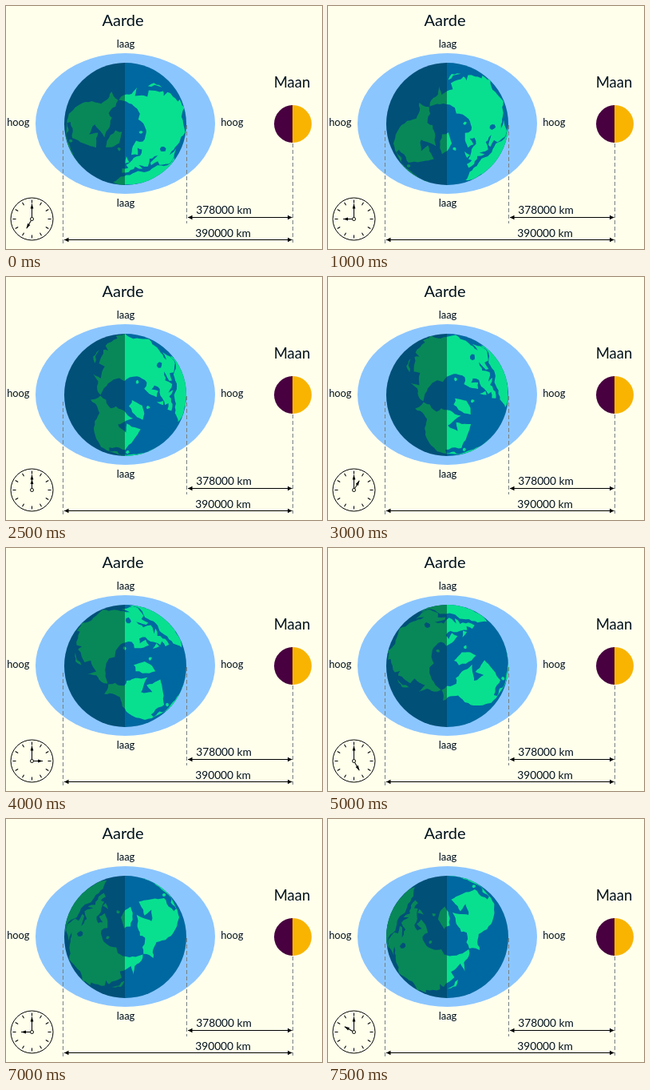
An HTML page with a canvas for the animation above (8000 ms loop, 396x304 px).

```html
<!DOCTYPE html>
<html lang="nl">
<head>
<meta charset="utf-8">
<title>Aarde, maan en getij</title>
<style>
html, body { margin: 0; width: 396px; height: 304px; overflow: hidden; background: #ffffec; }
canvas { display: block; }
</style>
</head>
<body>
<canvas id="stage" width="396" height="304"></canvas>
<script>
const ctx = document.getElementById('stage').getContext('2d');
const STEP = 500, STEPS = 16, START_HOUR = 7, START_LON = -85;
const RAD = Math.PI / 180, TAU = Math.PI * 2;
const PAPER = '#ffffec', INK = '#000';
const EARTH = { x: 149.5, y: 147.5, r: 76.5 };
const NIGHT = { sea: '#005078', land: '#088858' };
const DAY = { sea: '#0068a0', land: '#08e090' };

let seed = 11;
function random() {
  seed = (seed * 16807) % 2147483647;
  return seed / 2147483647;
}
const jitter = size => (random() - 0.5) * 2 * size;

// Orthographic view from above the north pole
function project(lon, lat) {
  const r = EARTH.r * (lat < 0 ? 1 - lat / 40 : Math.cos(lat * RAD));
  return [r * Math.cos(lon * RAD), -r * Math.sin(lon * RAD)];
}

// Joins key points (longitude, latitude) with a slightly ragged shore
function shore(...keys) {
  const points = [];
  keys.forEach(([lon, lat], i) => {
    const [lon2, lat2] = keys[(i + 1) % keys.length];
    const [x, y] = project(lon, lat), [x2, y2] = project(lon2, lat2);
    const parts = Math.max(1, Math.round(Math.hypot(x2 - x, y2 - y) / 4));
    points.push([x, y]);
    for (let k = 1; k < parts; k++) {
      const t = k / parts;
      const [px, py] = project(lon + (lon2 - lon) * t, lat + (lat2 - lat) * t);
      points.push([px + jitter(0.8), py + jitter(0.8)]);
    }
  });
  return points;
}

function blob(lon, lat, size) {
  const [x, y] = project(lon, lat);
  return Array.from({ length: 7 }, (_, i) => {
    const a = i * TAU / 7, r = size * (1 + jitter(0.3));
    return [x + r * Math.cos(a), y + r * Math.sin(a)];
  });
}

const eurasia = shore(
  [190, 66], [179, 62], [163, 60], [157, 51], [156, 61], [136, 55], [140, 48], [128, 40],
  [126, 35], [121, 39], [122, 30], [108, 21], [109, 12], [102, 12], [103, 2], [98, 15],
  [92, 22], [80, 13], [77, 8], [72, 20], [57, 26], [48, 30], [59, 22], [45, 13], [35, 29],
  [36, 36], [27, 37], [28, 41], [41, 42], [30, 46], [23, 38], [13, 45], [16, 38], [8, 44],
  [-1, 38], [-9, 37], [-9, 43], [-1, 44], [-4, 48], [9, 55], [20, 55], [28, 60], [22, 64],
  [17, 57], [6, 59], [13, 67], [28, 71], [40, 66], [68, 69], [104, 77], [120, 73], [165, 70]);
const africa = shore(
  [33, 31], [43, 12], [51, 12], [42, -8], [10, -8], [8, 4], [-8, 4], [-17, 14], [-10, 30],
  [10, 37], [20, 31]);
const america = shore(
  [-168, 66], [-156, 71], [-128, 71], [-120, 76], [-85, 75], [-62, 66], [-78, 65], [-94, 60],
  [-79, 52], [-77, 62], [-56, 52], [-66, 45], [-76, 35], [-80, 26], [-90, 30], [-97, 26],
  [-96, 18], [-88, 21], [-84, 10], [-72, 12], [-50, 0], [-50, -8], [-80, -8], [-78, 6],
  [-86, 11], [-105, 20], [-113, 30], [-124, 42], [-135, 59], [-150, 60], [-162, 55], [-162, 60]);
const greenland = shore([-45, 60], [-54, 69], [-62, 79], [-28, 82], [-22, 71]);
const japan = shore([130, 32], [140, 35], [144, 44], [140, 42], [138, 37]);
const britain = shore([-5, 50], [1, 51], [-3, 58]);
const iceland = blob(-19, 65, 2.3), novaya = blob(57, 73, 2.2), cuba = blob(-78, 21, 2);
const lands = [eurasia, africa, america, greenland, japan, britain, iceland, novaya, cuba];
const caspian = blob(51, 42, 3.2);

function disc(x, y, rx, ry, color) {
  ctx.fillStyle = color;
  ctx.beginPath();
  ctx.ellipse(x, y, rx, ry, 0, 0, TAU);
  ctx.fill();
}

function line(x1, y1, x2, y2) {
  ctx.beginPath();
  ctx.moveTo(x1, y1);
  ctx.lineTo(x2, y2);
  ctx.stroke();
}

function poly(points, color) {
  ctx.fillStyle = color;
  ctx.beginPath();
  points.forEach(([x, y]) => ctx.lineTo(x, y));
  ctx.fill();
}

function clipBox(x, y, w, h) {
  ctx.beginPath();
  ctx.rect(x, y, w, h);
  ctx.clip();
}

function earthHalf(x, turn, tone) {
  const { x: cx, y: cy, r } = EARTH;
  ctx.save();
  clipBox(x, cy - 80, 80, 160);
  disc(cx, cy, r, r, tone.sea);
  ctx.clip();
  ctx.translate(cx, cy);
  ctx.rotate(-turn * RAD);
  lands.forEach(land => poly(land, tone.land));
  poly(caspian, tone.sea);
  ctx.restore();
}

function moonHalf(x, color) {
  ctx.save();
  clipBox(x, 120, 30, 56);
  disc(359.5, 147.5, 23.5, 23.5, color);
  ctx.restore();
}

function text(str, x, y, size) {
  ctx.font = size + 'px "Comic Sans MS", Lato, sans-serif';
  ctx.fillStyle = '#00101c';
  ctx.textAlign = 'center';
  ctx.fillText(str, x, y);
}

function labels() {
  text('Aarde', 146.5, 24.5, 20);
  text('Maan', 358.5, 101.5, 18.5);
  [52, 251].forEach(y => text('laag', 150, y, 13));
  [15.3, 283.3].forEach(x => text('hoog', x, 150, 12.8));
  text('378000 km', 273, 259.5, 13.7);
  text('390000 km', 272, 288.5, 13.7);
}

function arrowHead(x, y, dx) {
  poly([[x, y], [x + dx, y - 2.8], [x + dx, y + 2.8]], INK);
}

function span(x1, x2, y) {
  ctx.strokeStyle = INK;
  line(x1, y, x2, y);
  arrowHead(x1, y, 5.5);
  arrowHead(x2, y, -5.5);
}

function distances() {
  ctx.lineWidth = 1;
  ctx.strokeStyle = '#778080';
  ctx.setLineDash([5, 3]);
  line(71.5, 156, 71.5, 297);
  line(226.5, 149, 226.5, 272);
  line(359.5, 172, 359.5, 296);
  ctx.setLineDash([]);
  span(228, 358.5, 264.5);
  span(73, 358.5, 292.5);
}

function hand(hour, length) {
  ctx.save();
  ctx.rotate(hour * TAU / 12);
  line(0, -2, 0, -length);
  poly([[0, -length], [1.9, -length + 6], [-1.9, -length + 6]], INK);
  ctx.restore();
}

function clock(hour) {
  ctx.save();
  ctx.translate(32.5, 266.5);
  ctx.strokeStyle = INK;
  ctx.lineWidth = 1;
  disc(0, 0, 26.5, 26.5, PAPER);
  ctx.stroke();
  for (let i = 0; i < 12; i++) {
    line(0, -24, 0, -20);
    ctx.rotate(TAU / 12);
  }
  hand(0, 19);
  hand(hour, 13.5);
  disc(0, 0, 2, 2, PAPER);
  ctx.stroke();
  ctx.restore();
}

function draw(step) {
  const turn = START_LON + step * 15;
  ctx.fillStyle = PAPER;
  ctx.fillRect(0, 0, 396, 304);
  disc(149.5, 147, 112.5, 88, '#8cc6ff');
  earthHalf(69, turn, NIGHT);
  earthHalf(149, turn, DAY);
  moonHalf(329, '#480040');
  moonHalf(359, '#f8b400');
  distances();
  labels();
  clock(START_HOUR + step);
}

const begin = performance.now();
function tick() {
  const elapsed = Math.max(0, performance.now() - begin);
  draw(Math.floor(elapsed / STEP) % STEPS);
  requestAnimationFrame(tick);
}
tick();
</script>
</body>
</html>
```
